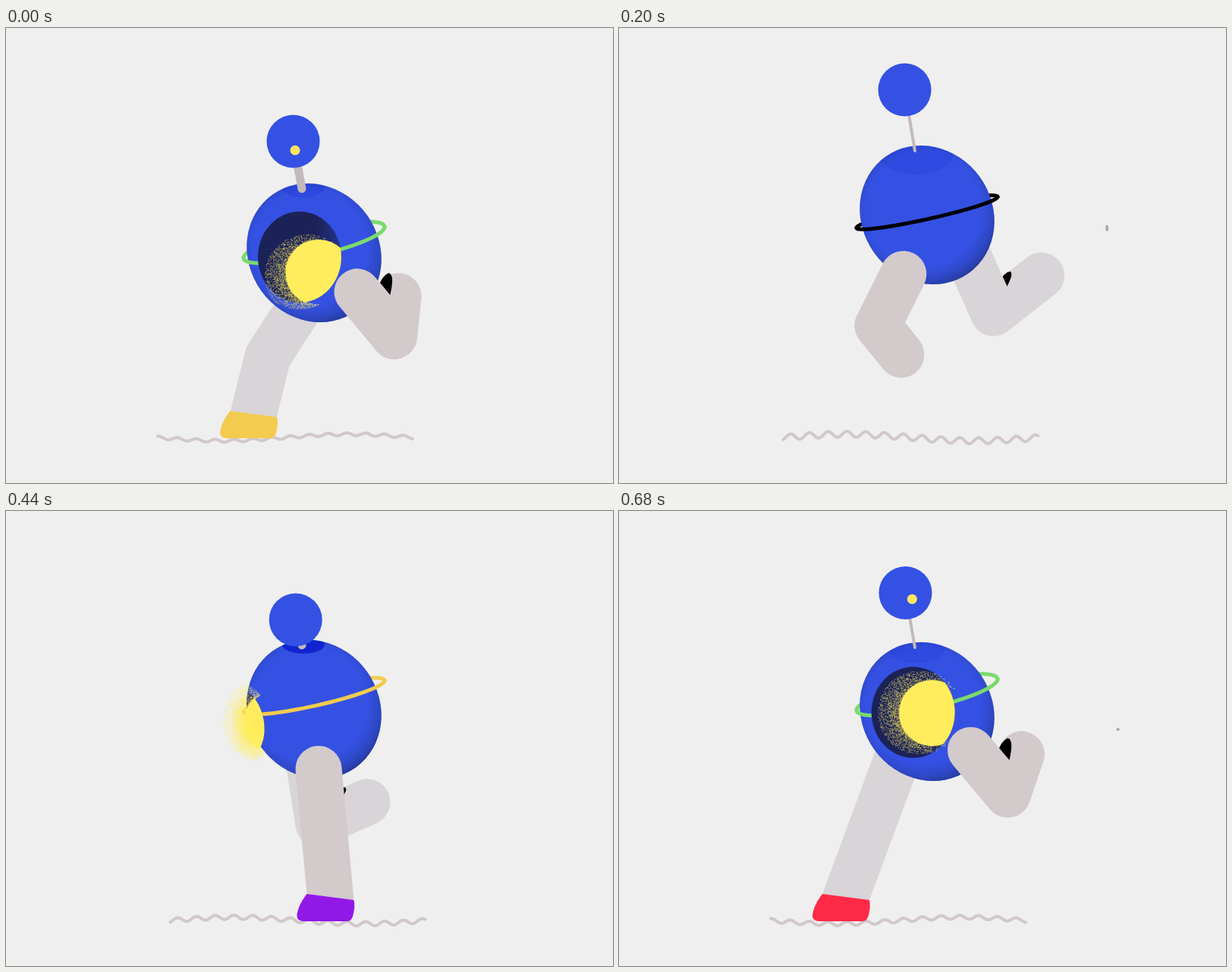
These frames come from a looping animation (800x600 px, 0.72 s). An HTML page:

```html
<!DOCTYPE html>
<html lang="en">
<head>
<meta charset="utf-8">
<title>Running robot</title>
<style>
  html, body { margin: 0; width: 100%; height: 100%; overflow: hidden; background: #efefef; }
  svg { display: block; width: 100vw; height: 100vh; }
</style>
</head>
<body>
<svg id="stage" viewBox="0 0 800 600">
  <defs>
    <radialGradient id="shade" gradientUnits="userSpaceOnUse" cx="-8" cy="0" r="102">
      <stop offset=".74" stop-color="#1e2c70" stop-opacity="0"/>
      <stop offset=".89" stop-color="#1e2c70" stop-opacity=".25"/>
      <stop offset="1" stop-color="#1e2c70" stop-opacity=".6"/>
    </radialGradient>
    <radialGradient id="halo">
      <stop offset=".4" stop-color="#ffed5e" stop-opacity=".75"/>
      <stop offset="1" stop-color="#ffed5e" stop-opacity="0"/>
    </radialGradient>
    <linearGradient id="dark">
      <stop offset=".7" stop-color="#1b2257"/>
      <stop offset="1" stop-color="#1b2257" stop-opacity=".6"/>
    </linearGradient>
    <clipPath id="inBody"><ellipse id="bodyClip" rx="94.3" ry="85.7"/></clipPath>
    <clipPath id="inHole"><ellipse id="holeClip"/></clipPath>
    <clipPath id="inGlow"><ellipse id="glowClip"/></clipPath>
  </defs>
</svg>
<script>
const STEP = 40, COUNT = 18, HALF = 9;
const GREEN = '#7ada6c', PINK = '#fb80f0', RED = '#ff2a47', YELLOW = '#f3cb4f',
      PURPLE = '#9218e8', BLACK = '#000', BLUE = '#3451e3', SUN = '#ffed5e';
const ringColors = [GREEN, PINK, BLACK, RED, YELLOW, PURPLE];
const shoeColors = [RED, YELLOW, PURPLE, GREEN, '#ef97c6'];

const stage = document.getElementById('stage');
const byId = id => document.getElementById(id);
const clamp = (v, lo, hi) => Math.max(lo, Math.min(hi, v));
const rad = deg => deg * Math.PI / 180;

function set(node, attrs) {
  for (const k in attrs) node.setAttribute(k, attrs[k]);
  return node;
}
function add(tag, attrs = {}, parent = stage) {
  const node = document.createElementNS('http://www.w3.org/2000/svg', tag);
  parent.appendChild(node);
  return set(node, attrs);
}
const show = (node, on) => node.setAttribute('visibility', on ? 'visible' : 'hidden');

// Smooth curve through rows of [time, ...values]; period 0 means open ends.
function curve(rows, t, period) {
  const n = rows.length;
  t = period ? t % period : clamp(t, rows[0][0], rows[n - 1][0]);
  const at = i => {
    if (!period) return rows[clamp(i, 0, n - 1)];
    const row = rows[(i + n) % n].slice();
    row[0] += Math.floor(i / n) * period;
    return row;
  };
  let i = n - 1;
  while (i > 0 && rows[i][0] > t) i--;
  const [a, b, c, d] = [at(i - 1), at(i), at(i + 1), at(i + 2)];
  const w = c[0] - b[0];
  if (!w) return b.slice(1);
  const u = (t - b[0]) / w, u2 = u * u, u3 = u2 * u;
  return b.slice(1).map((p, k) => {
    const q = c[k + 1];
    const m0 = (q - a[k + 1]) / (c[0] - a[0]) * w;
    const m1 = (d[k + 1] - p) / (d[0] - b[0]) * w;
    return (2 * u3 - 3 * u2 + 1) * p + (u3 - 2 * u2 + u) * m0 + (3 * u2 - 2 * u3) * q + (u3 - u2) * m1;
  });
}

// Each stride: time, body top, height of the antenna ball above it
const bounce = [[0, 205, 55.5], [2, 170, 26.5], [3, 164, 59.5], [5, 155, 73.5], [7, 161, 69], [8, 173, 65]];
// The body's turn, as the x of the front hip
const turn = [[0, 463], [3, 396], [6, 369], [9, 365.5], [11, 412], [14, 459], [17, 463.5]];
const turnAt = f => curve(turn, f, COUNT)[0];

// foot: start, travel, easing power; air: time, thigh angle, shin angle, shin length
const frontLeg = {
  color: '#d3cacb', land: 9, steps: 4, foot: [271.5, 234, 1], thigh: 76, shin: 88, fold: 19,
  hip(f, top) {
    const x = turnAt(f);
    return [x, top + 172 - .0063 * (x - 395) ** 2];
  },
  air: [[14, 50.6, -60, 52.6], [17, 50.1, -71, 56], [18, 50.3, -84, 53], [21, 101.4, -30, 36], [25, 126.7, 143, 68]]
};
const backLeg = {
  color: '#d8d4d7', land: 17, steps: 5, foot: [299, 218, 1.5], thigh: 80, shin: 78, fold: 13,
  hip(f, top) {
    const x = 830 - turnAt(f + 1);
    return [x, top + 164 - .0063 * (x - 410) ** 2];
  },
  air: [[25, 66, -38, 80], [27, 47, -43, 35.4], [29, 81, -24, 70], [32, 128, 160, 44]]
};

const FLAT_SHOE = 'M-31-4L31 4Q32.5 12 31 19Q29 32 23 32H-35Q-45 32-44 23Q-42 10-31-4Z';
const PUSH_SHOE = 'M-28 14.5L28-14.5L37 6Q42 18 30 27Q12 37-20 41.5Q-33 42-31 30Q-31 24-28 14.5Z';

function standKnee(leg, hx, hy, ax, ay) {
  const dx = ax - hx, dy = ay - hy, d = Math.hypot(dx, dy);
  if (d >= leg.thigh + leg.shin) return [(hx + ax) / 2, (hy + ay) / 2];
  const along = (leg.thigh ** 2 - leg.shin ** 2 + d * d) / (2 * d);
  const out = Math.sqrt(leg.thigh ** 2 - along ** 2);
  return [hx + (dx * along - dy * out) / d, hy + (dy * along + dx * out) / d];
}

function makeLeg(leg) {
  const limb = { fill: 'none', stroke: leg.color, 'stroke-width': 61, 'stroke-linecap': 'round' };
  const shin = add('path', limb), crook = add('path'), thigh = add('path', limb);
  const crease = add('path', { d: 'M-23-18Q-12-36 8-29.5Q-11-32-23-18Z', stroke: BLACK, 'stroke-width': 1 });
  const shoe = add('path');

  return (f, top) => {
    const t = f < leg.land ? f + COUNT : f, n = t - leg.land;
    const stands = n < leg.steps, pushes = n === leg.steps - 1;
    const [hx, hy] = leg.hip(f, top);
    let kx, ky, ax, ay, tucked = false;
    if (stands) {
      const [x0, travel, power] = leg.foot;
      ax = x0 + travel * (n / (leg.steps - 1)) ** power;
      ay = pushes ? 499.5 : 509;
      [kx, ky] = standKnee(leg, hx, hy, ax, ay);
    } else {
      const [a, b, len] = curve(leg.air, t, 0);
      kx = hx + leg.thigh * Math.cos(rad(a));
      ky = hy + leg.thigh * Math.sin(rad(a));
      ax = kx + len * Math.cos(rad(b));
      ay = ky + len * Math.sin(rad(b));
      tucked = a > 90 && len < leg.thigh / 2;
    }
    set(shin, { d: `M${kx} ${ky}L${ax} ${ay}` });
    set(thigh, { d: `M${hx} ${hy}L${kx} ${ky}` });

    // Shadow in the hollow of the knee
    const a = Math.hypot(hx - kx, hy - ky), b = Math.hypot(ax - kx, ay - ky);
    const ux = (hx - kx) / a, uy = (hy - ky) / a, vx = (ax - kx) / b, vy = (ay - ky) / b;
    const cos = ux * vx + uy * vy, bent = cos > -.15 && !stands && !tucked;
    show(crook, bent);
    if (bent) {
      const side = ux * vy > uy * vx ? 1 : -1, q = leg.fold;
      const nx = -uy * side, ny = ux * side;
      const up = Math.min(66, 30.5 * Math.sqrt((1 + cos) / (1 - cos)));
      const at = (i, j) => `${kx + ux * (up + i * q) + nx * (30.5 + j * q)} ${ky + uy * (up + i * q) + ny * (30.5 + j * q)}`;
      set(crook, { d: `M${at(0, 0)}Q${at(.25, .5)} ${at(.15, .9)}Q${at(-.2, 1.2)} ${at(-1.1, 0)}Z` });
    }

    const transform = `translate(${ax} ${ay})`;
    set(crease, { transform });
    show(crease, tucked);
    show(shoe, stands);
    set(shoe, { d: pushes ? PUSH_SHOE : FLAT_SHOE, fill: shoeColors[n] || 'none', transform });
  };
}

// Grainy light, pointing left
function grain() {
  let seed = 7, d = '';
  const rnd = () => (seed = seed * 16807 % 2147483647) / 2147483647;
  for (let i = 0; i < 3400; i++) {
    const a = (rnd() + rnd() + rnd() - 1.5) * 1.7;
    const r = 42 + 30 * rnd() ** 1.8 * Math.cos(a / 2) ** 3;
    d += `M${(-r * Math.cos(a)).toFixed(1)} ${(r * Math.sin(a)).toFixed(1)}h.8v.8h-.8z`;
  }
  return d;
}

const round = { fill: 'none', 'stroke-linecap': 'round', 'stroke-linejoin': 'round' };
const ground = add('path', { ...round, stroke: '#d1c8c9', 'stroke-width': 4 });
const speck = add('path', { ...round, stroke: '#aaa', 'stroke-width': 4 });
const poseBack = makeLeg(backLeg);
const ringBack = add('path', { ...round, 'stroke-width': 5 });
const halo = add('ellipse', { rx: 30, ry: 50, fill: 'url(#halo)' });
const body = add('g');
for (const fill of [BLUE, 'url(#shade)']) add('ellipse', { rx: 94.3, ry: 85.7, fill }, body);
const clipped = (id, parent) => add('g', { 'clip-path': `url(#${id})` }, parent);
const cap = add('ellipse', { fill: '#0f1fd0' }, clipped('inBody'));
const ringFront = add('path', { ...round, 'stroke-width': 5 });
const face = add('g');
const hole = add('ellipse', { fill: 'url(#dark)' }, clipped('inBody', face));
const glow = add('path', { d: grain(), fill: SUN, opacity: .75 }, clipped('inGlow', face));
const sun = add('circle', { r: 43.5, fill: SUN }, clipped('inHole', face));
const rod = add('path', { ...round, stroke: '#c3b9bb' });
const ball = add('circle', { r: 35, fill: BLUE });
const eye = add('circle', { fill: '#ffe562' });
const poseFront = makeLeg(frontLeg);

function drawGround(p, top) {
  const x0 = 200 + 21 * Math.max(0, Math.sin(Math.PI * p / 7));
  const swell = p > 1 && p < 8 ? -4.3 : 4.3;
  const ripple = clamp(3.8 - (top - 160) * .09, 1.9, 4);
  let d = '';
  for (let x = 0; x <= 337; x += 2) {
    const y = 540 + swell * Math.sin(2 * Math.PI * x / 337)
      - ripple * Math.cos(2 * Math.PI * (x0 + x - 226) / 24.8);
    d += `${d ? 'L' : 'M'}${x0 + x} ${y.toFixed(2)}`;
  }
  set(ground, { d });
}

function drawSpeck(p) {
  const u = (p - 5) / 3;
  show(speck, u >= 0);
  const len = 4 * (1 - u);
  set(speck, { d: `M${643 + 14.5 * u} ${264 + 24 * u ** 4 - len / 2}l.3 ${len}` });
}

function drawRing(f, top) {
  const rise = 77 - 13 * Math.cos(rad((f - 14.7) * 20)) + .15 * (top - 165);
  const open = 8 + (turnAt(f) - 365) * .105;
  const stroke = ringColors[Math.floor((f + 1) % COUNT / 3)];
  const arc = sign => {
    let d = '';
    for (let i = 0; i <= 40; i++) {
      const a = Math.PI * i / 40, dx = 93 * Math.cos(a);
      d += `${i ? 'L' : 'M'}${406 + dx} ${top + rise - .22 * dx + sign * open * Math.sin(a)}`;
    }
    return d;
  };
  set(ringBack, { d: arc(-1), stroke });
  set(ringFront, { d: arc(1), stroke });
}

// The face slides around the left side as the body turns
function drawFace(f, top) {
  const cx = 312 + (turnAt(f) - 412) * 1.47, edge = clamp((387 - cx) / 75, 0, 1);
  const on = cx > 300, drop = top - 155;
  show(face, on);
  show(halo, on && edge > .8);
  const cy = top + 90 + .14 * drop + 18 * edge;
  const rx = 55 - 27 * edge, ry = 60 - 15 * edge;
  const sx = cx + 8 + Math.min(17, drop) + 22 * edge;
  const sy = top + 80 + .75 * drop + 17 * edge;
  const transform = `rotate(${-10 * edge} ${cx} ${cy})`;
  for (const node of [hole, byId('holeClip')]) set(node, { cx, cy, rx, ry, transform });
  set(byId('glowClip'), { cx, cy, rx: rx + 9, ry: ry + 9, transform });
  set(sun, { cx: sx, cy: sy });
  set(glow, { transform: `translate(${sx} ${sy}) rotate(${5 + cy - sy})` });
  set(halo, { cx: cx + 12, cy });
}

function drawAntenna(f, top, rise) {
  const stretch = clamp((rise - 58) / 15, 0, 1), depth = 18 + 20 * stretch;
  set(cap, { cx: 392, cy: top + depth * .35, rx: 28 + 20 * stretch, ry: depth * .65,
    opacity: (.6 - .4 * Math.cos(rad(f * 20))) * (1 - .8 * stretch) });
  const base = top + 7, y = top - rise, x = 385.4 - .11 * (base - y);
  set(rod, { d: `M390 ${base}L${x} ${y}`, 'stroke-width': clamp(4 + (64 - rise) * .9, 4, 11) });
  set(ball, { cx: x, cy: y });

  const t = f || COUNT, u = Math.max(0, (t - 14) / 4), a = rad(17 + 61 * u ** 3);
  show(eye, t >= 13);
  set(eye, { cx: x + 12 * Math.cos(a), cy: y + 12 * Math.sin(a), r: 10 - 3.5 * Math.min(1, u * 4 / 3) });
}

function draw(f) {
  const p = f % HALF, [top, rise] = curve(bounce, p, HALF);
  const transform = `translate(406 ${top + 91.5}) rotate(54.4)`;
  set(body, { transform });
  set(byId('bodyClip'), { transform });
  drawGround(p, top);
  drawSpeck(p);
  drawRing(f, top);
  drawFace(f, top);
  drawAntenna(f, top, rise);
  poseBack(f, top);
  poseFront(f, top);
}

let start = null, last = -1;
function tick(now) {
  if (start === null) start = now;
  const f = Math.floor((now - start) / STEP) % COUNT;
  if (f !== last) draw(last = f);
  requestAnimationFrame(tick);
}
draw(0);
requestAnimationFrame(tick);
</script>
</body>
</html>
```
